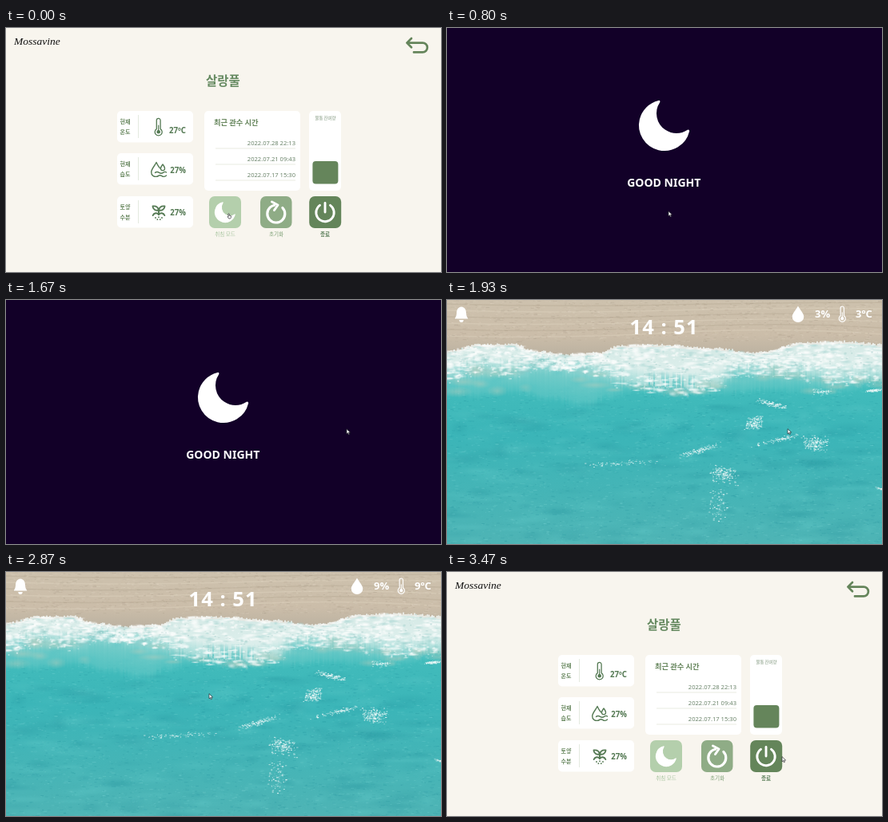
An HTML page with a canvas that plays this animation: 544 by 306 pixels, repeating every 3540 ms.

```html
<!DOCTYPE html>
<html lang="ko">
<head>
<meta charset="utf-8">
<title>Plant care panel</title>
<style>
html, body { margin: 0; width: 100%; height: 100%; overflow: hidden; background: #f8f5ee; }
canvas { display: block; }
</style>
</head>
<body>
<canvas id="stage" width="544" height="306"></canvas>
<script>
const W = 544, H = 306, LOOP = 3540;
const ctx = document.getElementById('stage').getContext('2d');
const SANS = '"Noto Sans", "Noto Sans CJK KR", "Noto Sans CJK", sans-serif';
const KOREAN = '"Noto Sans CJK KR", "Noto Sans CJK", sans-serif';
const GREEN = '#65855b', DARK = '#557a54';

let g = ctx;

function text(str, x, y, size, color, { weight = 400, align = 'left', family = SANS, spacing = 0 } = {}) {
  g.font = `${weight} ${size}px ${family}`;
  g.textAlign = align;
  g.letterSpacing = spacing + 'px';
  g.fillStyle = color;
  g.fillText(str, x, y);
}

function box(x, y, w, h, r, color) {
  g.fillStyle = color;
  g.beginPath();
  g.roundRect(x, y, w, h, r);
  g.fill();
}

function disc(x, y, r, color) {
  g.fillStyle = color;
  g.beginPath();
  g.arc(x, y, r, 0, Math.PI * 2);
  g.fill();
}

function line(d, color, width) {
  g.strokeStyle = color;
  g.lineWidth = width;
  g.lineCap = g.lineJoin = 'round';
  g.stroke(new Path2D(d));
}

function shape(d, color) {
  g.fillStyle = color;
  g.fill(new Path2D(d));
}

function at(x, y, scale, draw) {
  g.save();
  g.translate(x, y);
  g.scale(scale, scale);
  draw();
  g.restore();
}

function arc(x, y, r, from, to, width) {
  g.strokeStyle = '#fff';
  g.lineWidth = width;
  g.lineCap = 'round';
  g.beginPath();
  g.arc(x, y, r, from, to);
  g.stroke();
}

// Crescent with rounded tips, 64 units across
function moon(x, y, scale) {
  at(x, y, scale, () => {
    g.beginPath();
    g.arc(0, 0, 30.5, 0.234, 4.478);
    g.arc(15, -15, 26.5, 3.728, 0.984, true);
    g.closePath();
    g.fillStyle = g.strokeStyle = '#fff';
    g.lineWidth = 3;
    g.lineJoin = 'round';
    g.fill();
    g.stroke();
  });
}

function thermometer(x, y, scale, color) {
  at(x, y, scale, () => {
    line('M-2.4 2.6V-8.2A2.4 2.4 0 0 1 2.4 -8.2V2.6A4.5 4.5 0 1 1 -2.4 2.6Z', color, 1.3);
    line('M0 -2V5', color, 1.2);
    disc(0, 6.3, 2.3, color);
  });
}

function droplets(x, y) {
  at(x, y, 1, () => {
    line('M-1 8C-6 9.5 -9.5 6.5 -9.3 2.5C-9 -1.5 -5 -5 -3 -9.5Q-1 -5 1.4 -2.2', DARK, 1.4);
    line('M5 -7Q2.3 -3.4 2.5 -1.8A2.5 2.5 0 0 0 7.5 -1.8Q7.7 -3.4 5 -7Z', DARK, 1.3);
    line('M-4.5 3.4Q-2 1.6 .5 3.4T5.5 3.4T9.5 3M-1 7.6Q1.5 5.8 4 7.6T9.5 7', DARK, 1.4);
  });
}

function sprout(x, y) {
  at(x, y, 1, () => {
    line('M0 3V-2.5C-1 -7 -4 -8 -7.5 -7.5C-7.5 -4 -4 -1.5 0 -2.5C1 -7 4 -8 7.5 -7.5C7.5 -4 4 -1.5 0 -2.5', DARK, 1.9);
    line('M-7.3 4C-6 .6 -2 .4 0 3C2 .4 6 .6 7.3 4', DARK, 2);
    for (const [dx, dy] of [[-4, 7], [0, 6.2], [4, 7], [-1.6, 9.2], [1.8, 9.2]]) disc(dx, dy, 0.9, DARK);
  });
}

function reading(y, top, bottom, value, baseline) {
  box(139, y, 95, 39.5, 5, '#fff');
  box(165, y + 5, 0.8, 29, 0, '#dde5d8');
  const label = { weight: 700, align: 'center', family: KOREAN };
  text(top, 149, y + 15.5, 7, GREEN, label);
  text(bottom, 149, y + 29, 7, GREEN, label);
  text(value, 225, baseline, 9.7, DARK, { weight: 700, align: 'right' });
}

function dashboard() {
  g.fillStyle = '#f8f5ee';
  g.fillRect(0, 0, W, H);
  text('Mossavine', 10, 21, 13.5, '#111', { weight: 'italic 400', family: '"Liberation Serif", serif' });
  line('M507 13L501.4 18.6L507 24.2M502 18.6H521A5.9 5.9 0 0 1 521 30.4H510', GREEN, 2.7);
  text('살랑풀', 271.3, 71.5, 15.5, '#668a61', { weight: 700, align: 'center', family: KOREAN });

  reading(104, '현재', '온도', '27ºC', 131.7);
  reading(157, '현재', '습도', '27%', 182);
  reading(211, '토양', '수분', '27%', 235);
  thermometer(190.7, 124, 1, DARK);
  droplets(191, 178);
  sprout(191, 231);

  box(248, 104, 120, 100, 5, '#fff');
  text('최근 관수 시간', 260, 121.5, 9.3, GREEN, { weight: 700, family: KOREAN });
  ['2022.07.28 22:13', '2022.07.21 09:43', '2022.07.17 15:30'].forEach((s, i) => {
    text(s, 362, 146.5 + i * 20, 7.6, '#6b846a', { align: 'right' });
    box(262, 150.5 + i * 20, 100, 1, 0, '#e9ece2');
  });

  box(379, 104, 40, 100, 5, '#fff');
  text('물통 잔여량', 399.5, 115.3, 5.4, '#7d947a', { align: 'center', family: KOREAN });
  box(383.4, 167, 32, 28.5, 4, GREEN);

  box(254, 211, 40, 40, 7, '#b4cfac');
  moon(274, 231, 0.41);
  box(318, 211, 39.5, 40, 7, '#8fac86');
  arc(337.8, 233, 11, -0.75, 4.5, 3.2);
  line('M332.5 218L340 222L335.5 228.5', '#fff', 3);
  box(379.2, 211, 40, 40, 7, '#64855a');
  arc(399, 231.5, 11.2, -0.95, Math.PI + 0.95, 2.9);
  line('M399 219.5V231', '#fff', 2.9);

  const caption = { weight: 500, align: 'center', family: KOREAN };
  text('취침 모드', 274, 261.3, 6.6, '#a9c6a0', caption);
  text('초기화', 338, 261.3, 6.6, '#7da075', caption);
  text('종료', 399, 261.3, 6.6, DARK, { ...caption, weight: 700 });
}

function night() {
  g.fillStyle = '#120028';
  g.fillRect(0, 0, W, H);
  moon(272, 122, 1);
  text('GOOD NIGHT', 271.3, 199, 14, '#fff', { weight: 600, align: 'center' });
}

function seeded(seed) {
  return () => (seed = (seed * 16807) % 2147483647) / 2147483647;
}

// Eased interpolation along [x0, y0, x1, y1, ...]
function curve(pts, x) {
  let i = 0;
  while (i < pts.length - 4 && x > pts[i + 2]) i += 2;
  const u = (x - pts[i]) / (pts[i + 2] - pts[i]);
  return pts[i + 1] + (pts[i + 3] - pts[i + 1]) * u * u * (3 - 2 * u);
}

// Lower edges of the sand, the white foam and the pale shallows
const SHORE = [0, 64, 40, 56, 80, 55, 112, 64, 150, 68, 190, 66, 215, 57, 260, 56, 330, 60, 385, 66, 450, 53, 500, 52, 544, 56];
const FOAM = [0, 92, 40, 82, 85, 87, 115, 76, 150, 79, 190, 86, 215, 98, 255, 108, 300, 112, 335, 104, 365, 86, 400, 84, 440, 90, 490, 100, 544, 96];
const SHALLOW = [0, 122, 40, 126, 80, 120, 130, 129, 175, 137, 200, 127, 240, 118, 340, 122, 400, 117, 480, 121, 544, 110];

function blot(x, y, rx, ry, rgb, alpha) {
  at(x, y, 1, () => {
    g.scale(rx, ry);
    const soft = g.createRadialGradient(0, 0, 0, 0, 0, 1);
    soft.addColorStop(0, `rgba(${rgb},${alpha})`);
    soft.addColorStop(1, `rgba(${rgb},0)`);
    g.fillStyle = soft;
    g.fillRect(-1, -1, 2, 2);
  });
}

function flecks(count, x, y, w, h, light, dark, alpha, rnd) {
  for (let i = 0; i < count; i++) {
    g.fillStyle = `rgba(${rnd() < 0.5 ? light : dark},${rnd() * alpha})`;
    g.fillRect(x + rnd() * w, y + rnd() * h, 1 + rnd() * 4, 1);
  }
}

function spray(x, y, w, h, slope, count, rnd) {
  for (let i = 0; i < count; i++) {
    const u = rnd() + rnd() - 1, v = rnd() + rnd() - 1;
    g.fillStyle = `rgba(240,250,249,${0.2 + rnd() * 0.65})`;
    g.fillRect(x + u * w, y + v * h + u * w * slope, 0.7 + rnd() * 1.7, 0.7 + rnd() * 0.7);
  }
}

function paintSea(rnd) {
  const sea = g.createLinearGradient(0, 95, 0, H);
  sea.addColorStop(0, '#43bdbc');
  sea.addColorStop(0.35, '#3bb5b8');
  sea.addColorStop(1, '#4eb4b5');
  g.fillStyle = sea;
  g.fillRect(0, 0, W, H);
  for (let i = 0; i < 230; i++) {
    const rgb = rnd() < 0.5 ? '25,135,148' : '105,208,206';
    blot(rnd() * W, 130 + rnd() * 180, 10 + rnd() * 30, 3 + rnd() * 7, rgb, 0.08 + rnd() * 0.16);
  }
  flecks(4200, 0, 112, W, 194, '150,228,225', '20,130,145', 0.22, rnd);
}

function paintSand(rnd) {
  const sand = g.createLinearGradient(0, 0, 0, 68);
  sand.addColorStop(0, '#cdc1ad');
  sand.addColorStop(0.65, '#cbbda9');
  sand.addColorStop(1, '#bcb2a1');
  g.fillStyle = sand;
  g.beginPath();
  g.lineTo(0, 0);
  for (let x = 0; x <= W; x += 2) g.lineTo(x, curve(SHORE, x) + 3);
  g.lineTo(W, 0);
  g.fill();
  for (let i = 0; i < 6; i++) {
    line(`M0 ${5 + i * 8}Q140 ${9 + i * 8} 280 ${6 + i * 7}T${W} ${3 + i * 8}`, i % 2 ? 'rgba(228,218,200,.3)' : 'rgba(160,145,125,.22)', 1.5);
  }
  flecks(1800, 0, 0, W, 52, '232,222,206', '150,136,118', 0.26, rnd);
}

// Columns fade from white foam through pale turquoise into the sea
function paintSurf(rnd) {
  for (let x = 0; x < W; x += 2) {
    const top = curve(SHORE, x) + (rnd() - 0.5) * 3;
    const mid = curve(FOAM, x) + (rnd() - 0.5) * 5;
    const end = curve(SHALLOW, x) + (rnd() - 0.5) * 4;
    const u = (mid - top) / (end - top);
    const fade = g.createLinearGradient(0, top, 0, end);
    fade.addColorStop(0, 'rgba(238,241,237,.85)');
    fade.addColorStop(u * 0.6, 'rgba(228,241,238,.95)');
    fade.addColorStop(u, 'rgba(176,224,220,.9)');
    fade.addColorStop(u + (1 - u) * 0.35, 'rgba(120,205,202,.85)');
    fade.addColorStop(0.85, 'rgba(100,200,198,.6)');
    fade.addColorStop(1, 'rgba(80,195,194,0)');
    g.fillStyle = fade;
    g.fillRect(x, top, 2, end - top);
  }
  for (let i = 0; i < 70; i++) {
    const x = rnd() * W, a = curve(FOAM, x), b = curve(SHALLOW, x);
    blot(x, a + (b - a) * rnd() * 0.8, 8 + rnd() * 16, 3 + rnd() * 6, rnd() < 0.45 ? '190,205,188' : '85,195,195', 0.4);
  }
  for (let i = 0; i < 1100; i++) {
    const x = rnd() * W, a = curve(SHORE, x), b = curve(FOAM, x);
    const depth = rnd(), y = a + (b - a + 10) * depth;
    const white = rnd() < 0.85 - depth * 0.3;
    blot(x, y, 2 + rnd() * 7, 1 + rnd() * 2.2, white ? '253,254,253' : '140,200,197', white ? 0.75 : 0.4);
  }
  for (let i = 0; i < 1300; i++) {
    const x = rnd() * W, a = curve(SHORE, x), b = curve(FOAM, x);
    g.fillStyle = `rgba(${rnd() < 0.6 ? '255,255,255' : '150,195,192'},${rnd() * 0.5})`;
    g.fillRect(x, a + (b - a + 12) * rnd(), 1 + rnd() * 2, 0.7 + rnd());
  }
}

function paintBeach() {
  const rnd = seeded(41);
  paintSea(rnd);
  paintSand(rnd);
  paintSurf(rnd);
  spray(405, 130, 20, 4, 0.25, 130, rnd);
  spray(384, 154, 13, 10, -0.3, 170, rnd);
  spray(460, 179, 18, 11, 0.1, 190, rnd);
  spray(346, 219, 18, 13, 0.2, 180, rnd);
  spray(338, 258, 13, 24, -0.2, 90, rnd);
  spray(316, 188, 30, 4, -0.3, 120, rnd);
  spray(410, 176, 38, 4, -0.25, 100, rnd);
  spray(215, 204, 50, 4, -0.05, 70, rnd);
  spray(470, 115, 15, 5, 0.1, 60, rnd);
  spray(535, 113, 13, 2, -0.1, 90, rnd);
  spray(541, 236, 7, 2, 0.1, 30, rnd);
}

const photo = document.createElement('canvas');
photo.width = W;
photo.height = H;
g = photo.getContext('2d');
paintBeach();
g = ctx;

function beach(count) {
  g.drawImage(photo, 0, 0);
  shape('M18 8.5C22.5 9 24 12.5 24 17Q24 20.5 26.3 23.6H9.7Q12 20.5 12 17C12 12.5 13.5 9 18 8.5Z', '#fff');
  shape('M15.3 25H20.7A2.7 2.9 0 0 1 15.3 25Z', '#fff');
  text('14 : 51', 228.6, 43, 25.5, '#fff', { weight: 700, spacing: 1 });
  shape('M439 7.5C442 13 446.3 17 446.3 21A7.3 7 0 0 1 431.7 21C431.7 17 436 13 439 7.5Z', '#fff');
  text(count + '%', 460, 22, 13, '#fff', { weight: 600 });
  thermometer(494.3, 17.5, 0.9, '#fff');
  text(count + 'ºC', 511, 22, 13, '#fff', { weight: 600 });
}

function pointer(x, y, d) {
  at(x, y, 1, () => {
    shape(d, '#fff');
    line(d, '#2a2a30', 0.7);
  });
}

const ARROW = 'M0 0V5.8L1.4 4.6L2.4 6.8L3.4 6.3L2.5 4.2L4.2 4Z';
const HAND = 'M1 .5Q1.7 -.3 2.2 .6V2.6L4.4 3.2V5L3.6 6.5H1.6L0 4L1 3.8Z';

// Arrow stops: [tick, x, y]
const PATH = [[12, 277, 230], [21, 277, 230], [25, 426, 162], [31, 426, 162], [39, 318, 219], [43, 254, 153], [46, 254, 153], [52, 419, 232]];

function arrowAt(tick) {
  const i = PATH.findIndex(p => p[0] >= tick);
  const [t1, x1, y1] = PATH[i];
  const [t0, x0, y0] = PATH[Math.max(0, i - 1)];
  const u = t1 > t0 ? (tick - t0) / (t1 - t0) : 1;
  return [x0 + (x1 - x0) * u, y0 + (y1 - y0) * u];
}

function render(ms) {
  const tick = Math.min(52, Math.floor((ms + 4) * 0.015));
  if (tick < 12 || tick >= 47) dashboard();
  else if (tick < 29) night();
  else beach(Math.max(3, Math.min(9, 4 + Math.floor((tick - 32) / 2))));

  if (tick < 2) pointer(277, 232.5, HAND);
  else if (tick >= 12) pointer(...arrowAt(tick), ARROW);
}

const start = performance.now();
function loop() {
  render((performance.now() - start) % LOOP);
  requestAnimationFrame(loop);
}
loop();
</script>
</body>
</html>
```
